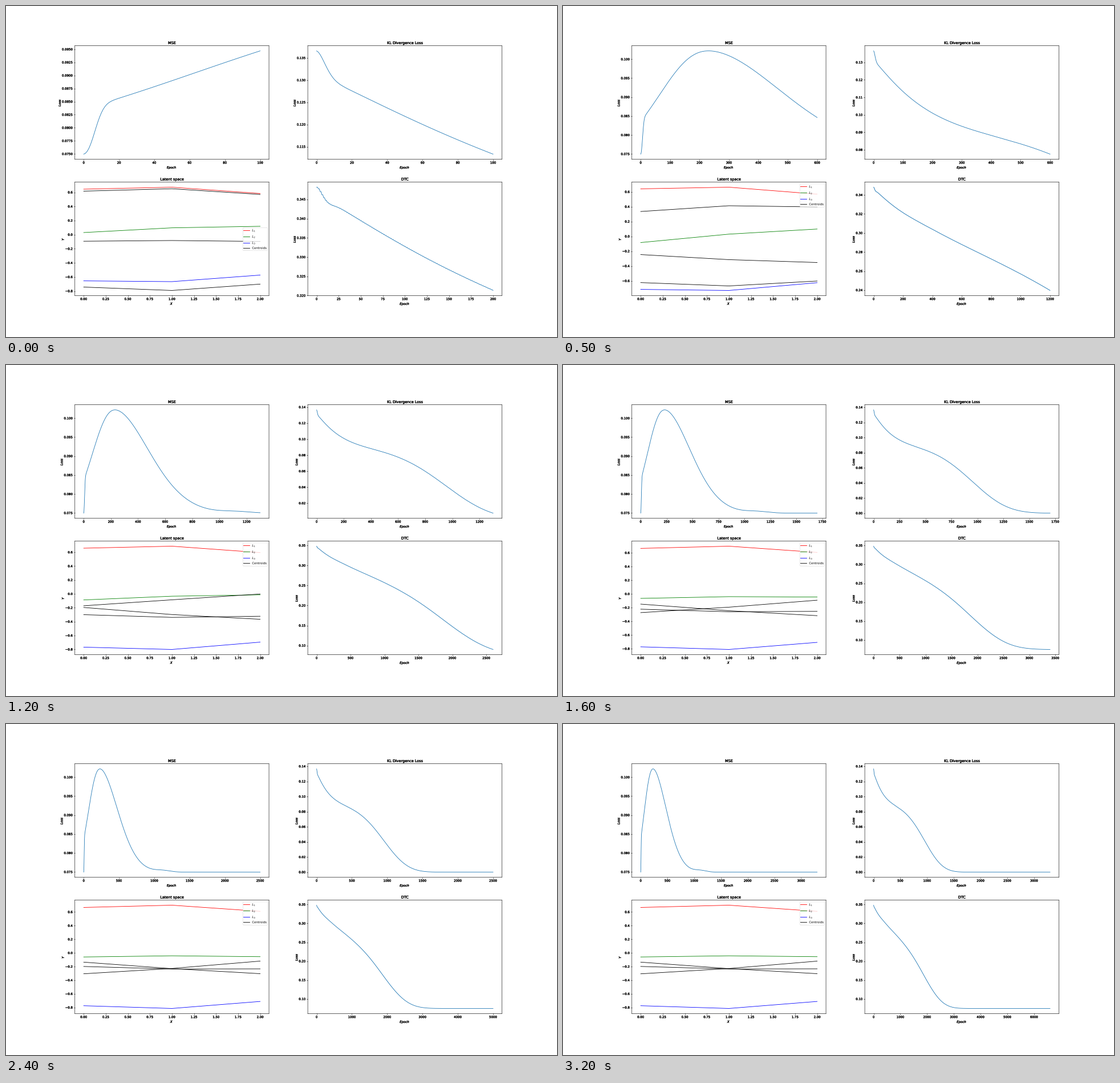
These frames come from a looping animation (966 px wide and 580 px high, 3300 ms). A matplotlib script:

```python
import numpy as np
import matplotlib.pyplot as plt
from matplotlib import patheffects
from matplotlib.animation import FuncAnimation

W, H, DPI = 966, 580, 40
FRAMES, STEP = 33, 100

plt.rcParams.update({
    "font.family": "DejaVu Sans",
    "font.size": 9.66,
    "text.hinting": "none",
    "axes.linewidth": 1.1,
    "axes.titlepad": 5,
    "xtick.major.width": 1.1,
    "ytick.major.width": 1.1,
    "lines.linewidth": 1.5,
})
HEAVY = [patheffects.withStroke(linewidth=0.55, foreground="black")]
PLAIN = [patheffects.Normal()]


def decay(x, scale, power):
    return np.exp(-(np.abs(x) / scale) ** power)


def mse_loss(e):
    """Quick warm-up, one lopsided hump, then a flat tail."""
    d = e - 232
    hump = np.where(d < 0, decay(d, 218.5, 2.25), decay(d, 361, 1.82))
    return (.07495 + .02725 * hump + .0004 * decay(e - 1120, 150, 2)
            - .00867 * decay(e, 8.15, 2.26))


def kl_loss(e):
    """Three stages that fade out one after another."""
    return (.0055 * decay(e, 6.8, 1.8) + .0446 * decay(e, 182, 1.13)
            + .0865 * decay(e, 1033, 3.873))


epochs = np.arange(FRAMES * STEP + 1)
mse, kl = mse_loss(epochs), kl_loss(epochs)
dtc = mse + 2 * kl

# Latent lines: colour, label, start pose, end pose, swing on the way
LATENT = [
    ("red", "$L_1$",
     (.645, .673, .584), (.667, .700, .610), (-.011, -.019, -.024)),
    ("green", "$L_2$",
     (.030, .097, .119), (-.059, -.042, -.055), (-.098, -.032, .030)),
    ("blue", "$L_3$",
     (-.655, -.666, -.573), (-.774, -.814, -.711), (-.030, -.025, -.015)),
    ("black", "Centroids",
     (.617, .651, .570), (-.306, -.228, -.120), (-.035, 0, .015)),
    ("black", None,
     (-.093, -.083, -.096), (-.135, -.230, -.304), (-.155, -.210, -.220)),
    ("black", None,
     (-.743, -.791, -.701), (-.198, -.235, -.233), (-.030, -.030, -.030)),
]


def latent(k, start, end, swing):
    start, end, swing = map(np.array, (start, end, swing))
    x = k / 6.6
    bump = (x * np.exp((1 - x * x) / 2)) ** 1.5
    return end + (start - end) * decay(k, 8.9, 2) + swing * bump


fig, axes = plt.subplots(2, 2, figsize=(W / DPI, H / DPI), dpi=DPI)
fig.subplots_adjust(left=.125, right=.9, bottom=.125, top=.88,
                    wspace=.2, hspace=.2)
ax_mse, ax_kl, ax_lat, ax_dtc = axes.flat


def setup(ax, title, xlabel="$Epoch$", ylabel="$Loss$"):
    for text in (ax.set_title(title), ax.set_xlabel(xlabel, labelpad=3),
                 ax.set_ylabel(ylabel, labelpad=0)):
        text.set_path_effects(HEAVY)
    for spine in ax.spines.values():
        spine.set_snap(False)


setup(ax_mse, "MSE")
setup(ax_kl, "KL Divergence Loss")
setup(ax_lat, "Latent space", "$X$", "$Y$")
setup(ax_dtc, "DTC")

mse_line, = ax_mse.plot([], [])
kl_line, = ax_kl.plot([], [])
dtc_line, = ax_dtc.plot([], [])
lat_lines = [ax_lat.plot(range(3), start, color=color, label=label)[0]
             for color, label, start, *_ in LATENT]
legend = ax_lat.legend(loc="upper right", borderpad=.25, labelspacing=.46)
for text in legend.get_texts():
    text.set_path_effects(PLAIN)


def update(k):
    n = (k + 1) * STEP
    mse_line.set_data(epochs[:n + 1], mse[:n + 1])
    kl_line.set_data(epochs[:n + 1], kl[:n + 1])
    half = np.arange(2 * n + 1)
    dtc_line.set_data(half, dtc[half // 2])
    for line, (_, _, *poses) in zip(lat_lines, LATENT):
        line.set_ydata(latent(k, *poses))
    legend.set_loc("right" if k < 5 else "upper right")
    for ax in axes.flat:
        ax.relim()
        ax.autoscale_view()
        for text in ax.get_xticklabels() + ax.get_yticklabels():
            text.set_path_effects(HEAVY)


anim = FuncAnimation(fig, update, frames=FRAMES, interval=100, repeat=True,
                     repeat_delay=0)
plt.show()
```
